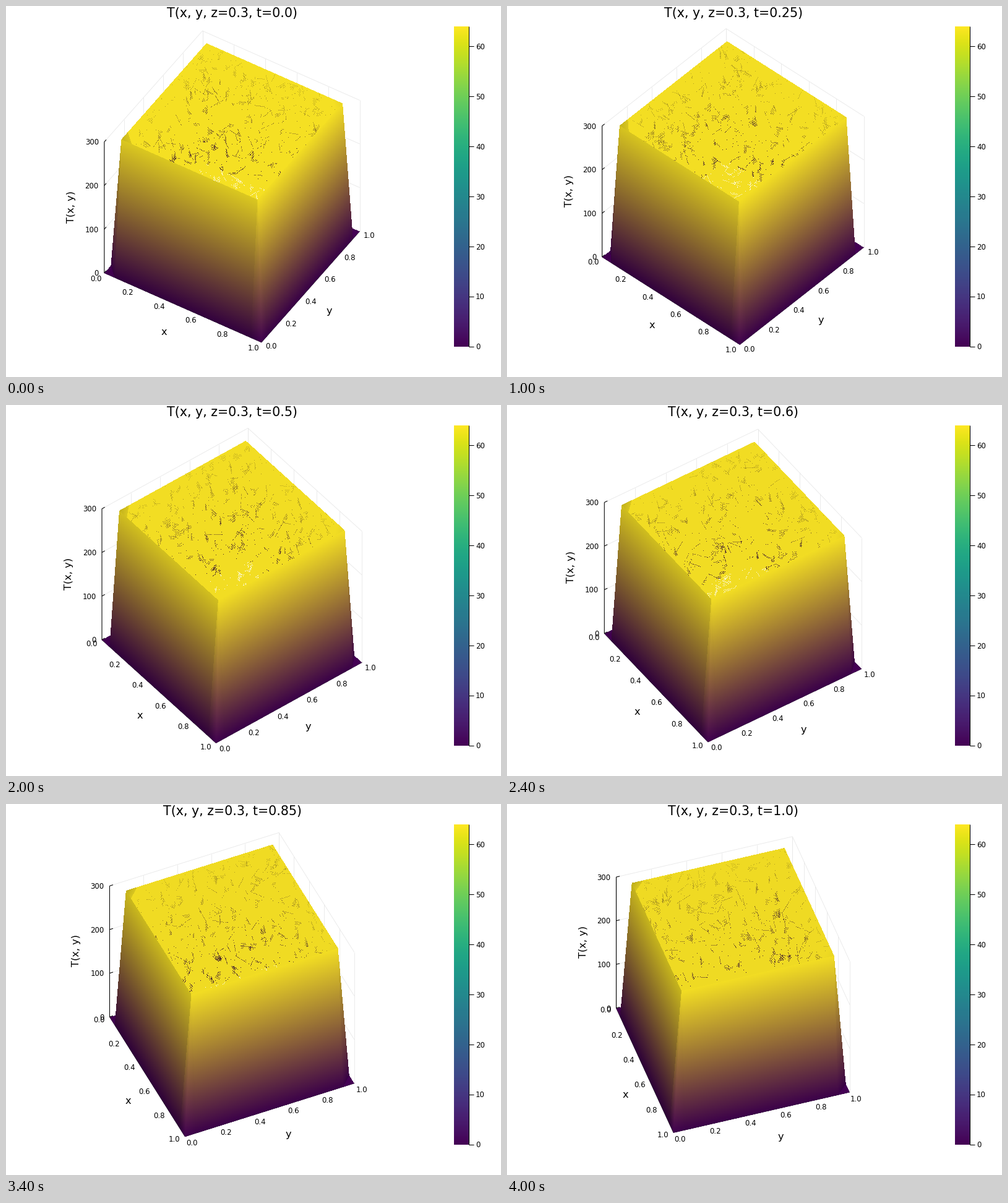
Animation, 800 px wide and 600 px high, one loop 4.2 s. Source, as a matplotlib script:

```python
import numpy as np
import matplotlib.pyplot as plt
from matplotlib.animation import FuncAnimation
from matplotlib.collections import LineCollection

WIDTH, HEIGHT, DPI = 800, 600, 100
FRAMES, INTERVAL = 21, 200
SIDE = 299.5                       # edge of the unit box in pixels
CENTRE = np.array([365.2, 292.0])
TILT = np.sqrt(0.5)                # sine and cosine of the 45 degree elevation
H = 1 / 15                         # grid spacing of the surface
K = 1 - H
LOW, HIGH = np.array([68, 1, 84]), np.array([253, 231, 37])
TICK, GUIDE, TITLE = 8.5, 11.7, 14.9

plt.rcParams["font.family"] = "DejaVu Sans"
fig = plt.figure(figsize=(WIDTH / DPI, HEIGHT / DPI), dpi=DPI, facecolor="white")
bar_ax = fig.add_axes([0, 0, 1, 1])
ax = fig.add_axes([0, 0, 1, 1])


def reset(axes):
    axes.clear()
    axes.set(xlim=(0, WIDTH), ylim=(HEIGHT, 0))
    axes.axis("off")


def show(axes, image, extent, **kw):
    axes.imshow(image, extent=extent, aspect="auto", interpolation="nearest", **kw)
    axes.set(xlim=(0, WIDTH), ylim=(HEIGHT, 0))


def line(axes, *points, zorder=1.5):
    axes.plot(*np.array(points).T, color="black", lw=.75, zorder=zorder,
              solid_capstyle="butt")


def label(axes, x, y, text, size=TICK, ha="center", **kw):
    axes.text(x, y, text, size=size, ha=ha, va="baseline", zorder=4, **kw)


class Camera:
    def __init__(self, degrees):
        angle = np.radians(degrees)
        self.cos, self.sin = np.cos(angle), np.sin(angle)
        self.x = SIDE * np.array([self.cos, self.sin * TILT])
        self.y = SIDE * np.array([self.sin, -self.cos * TILT])
        self.z = SIDE * np.array([0, -TILT])

    def __call__(self, x, y, z=0):
        return CENTRE + (x - .5) * self.x + (y - .5) * self.y + (z - .5) * self.z


def triangle(image, cam, corners, holes=None):
    """Fill a triangle, blending the corner colours; corners are (x, y, z, shade)."""
    a, b, c = (cam(*p[:3]) for p in corners)
    colors = np.array([(LOW + (HIGH - LOW) * p[2]) * p[3] for p in corners])
    x0, y0 = np.floor(np.min([a, b, c], axis=0)).astype(int)
    x1, y1 = np.ceil(np.max([a, b, c], axis=0)).astype(int) + 1
    gx, gy = np.meshgrid(np.arange(x0, x1) + .5, np.arange(y0, y1))
    (ux, uy), (vx, vy) = b - a, c - a
    area = ux * vy - uy * vx
    if abs(area) < 1e-6:
        return
    wb = ((gx - a[0]) * vy - (gy - a[1]) * vx) / area
    wc = (ux * (gy - a[1]) - uy * (gx - a[0])) / area
    weights = np.stack([1 - wb - wc, wb, wc], axis=-1)
    inside = weights.min(axis=-1) >= -1e-9
    if holes is not None:
        inside &= ~holes[y0:y1, x0:x1]
    patch = image[y0:y1, x0:x1]
    patch[inside, :3] = np.clip(weights[inside] @ colors, 0, 255)
    patch[inside, 3] = 255


def quad(image, cam, a, b, c, d, holes=None):
    triangle(image, cam, (a, b, c), holes)
    triangle(image, cam, (a, c, d), holes)


def pinholes(i, cam):
    """Ragged dotted strokes where the flat top lets the inside show through."""
    rng = np.random.default_rng(100 + i)
    mask = np.zeros((HEIGHT, WIDTH), bool)

    def punch(points):
        px, py = np.round(points).astype(int).T
        mask[py, px] = True

    for _ in range(165):
        start = cam(*rng.uniform(H, K, 2), 1)
        heading = rng.choice([0.1, 0.5, 1.1, 1.3, 2.1, 2.6]) + rng.normal(0, .15)
        step = 1.9 * np.array([np.cos(heading), np.sin(heading)])
        rows = rng.choice([1, 1, 2, 3, 5, 7])
        length = rng.integers(4, 16 if rows == 1 else 9)
        for row in range(rows):
            n = np.arange(max(length - row, 2))
            n = n[rng.random(n.size) < .75]
            punch(start + n[:, None] * step + [row % 2, 2 * row])
    punch([cam(u, v, 1) for u, v in rng.uniform(H, K, (200, 2))])
    return mask


def surface(i, cam):
    image = np.zeros((HEIGHT, WIDTH, 4), np.uint8)
    holes = pinholes(i, cam)
    top = .97 - .0012 * i
    left_top, left_low = .74 + .15 * cam.cos, .62 + .14 * cam.cos
    right_top, right_low = .96, .78 + .1 * cam.sin
    edge = .72 + .07 * cam.cos

    # inner side of the back walls
    quad(image, cam, (0, H, 0, .6), (0, K, 0, .6), (H, K, 1, .78), (H, H, 1, .78))
    quad(image, cam, (H, 1, 0, .6), (K, 1, 0, .6), (K, K, 1, .78), (H, K, 1, .78))
    for foot in ((0, K, 0, .6), (H, 1, 0, .6)):
        triangle(image, cam, ((0, 1, 0, .6), foot, (H, K, 1, .78)))

    # flat corners on the floor
    triangle(image, cam, ((0, 0, 0, .95), (0, H, 0, .95), (H, 0, 0, .95)))
    triangle(image, cam, ((1, 1, 0, 1), (1, K, 0, 1), (K, 1, 0, 1)))

    # top with its two softened corners
    quad(image, cam, (H, H, 1, top), (K, H, 1, top), (K, K, 1, top), (H, K, 1, top),
         holes)
    triangle(image, cam, ((H, H, 1, edge), (2 * H, H, 1, .86), (H, 2 * H, 1, .86)))
    triangle(image, cam, ((K, K, 1, .92), (K - H, K, 1, top), (K, K - H, 1, top)))

    # front walls and bevelled corners
    triangle(image, cam, ((0, H, 0, edge), (H, 0, 0, left_low), (H, H, 1, edge)))
    triangle(image, cam, ((K, 1, 0, .8), (1, K, 0, right_low), (K, K, 1, .92)))
    quad(image, cam, (H, 0, 0, left_low), (K, 0, 0, left_low),
         (K, H, 1, left_top), (H, H, 1, left_top))
    quad(image, cam, (1, H, 0, right_low), (1, K, 0, right_low),
         (K, K, 1, right_top), (K, H, 1, right_top))
    triangle(image, cam, ((1, 0, 0, .95), (K, 0, 0, left_low), (K, H, 1, .92)))
    triangle(image, cam, ((1, 0, 0, .95), (1, H, 0, right_low), (K, H, 1, .95)))
    return image


def draw_grid(cam):
    lines = []
    for s in np.linspace(0, 1, 6):
        lines += [[cam(0, s, 0), cam(0, s, 1)], [cam(s, 1, 0), cam(s, 1, 1)]]
    for z in np.linspace(0, 1, 4):
        lines.append([cam(0, 0, z), cam(0, 1, z), cam(1, 1, z)])
    ax.add_collection(LineCollection(lines, colors="0.91", linewidths=.6, zorder=1))


def draw_axes(cam):
    line(ax, cam(0, 0, 1), cam(0, 0), cam(1, 0), cam(1, 1))
    for s in np.linspace(0, 1, 6):
        px, py = cam(s, -.05)
        label(ax, px - 2 - 3.6 * cam.cos, py + 4.3, f"{s:.1f}")
        px, py = cam(1.05, s)
        label(ax, px + 6 * cam.sin, py + 4.8, f"{s:.1f}")
    for z in range(0, 301, 100):
        px, py = cam(0, 0, z / 300)
        line(ax, (px, py), cam(0, .02, z / 300))
        label(ax, px - 9, py + 4.6, str(z), ha="right")
    px, py = cam(.5, 0)
    label(ax, px - 31, py + 44, "x", GUIDE)
    px, py = cam(1, .5)
    label(ax, px + 30.5, py + 44, "y", GUIDE)
    px, py = cam(0, 0, .5)
    label(ax, px - 49, py - 1, "T(x, y)", GUIDE, rotation=90, rotation_mode="anchor")


def draw_colorbar():
    reset(bar_ax)
    left, right, top, bottom = 724, 748, 33, 551
    ramp = np.linspace(1, 0, 256)[:, None]
    show(bar_ax, ramp, (left, right, bottom, top), cmap="viridis")
    line(bar_ax, (right, top), (right, bottom))
    for value in range(0, 61, 10):
        y = bottom - value * (bottom - top) / 64
        line(bar_ax, (right, y), (right + 8, y))
        label(bar_ax, 759, y + 4.4, str(value), ha="left")


def update(i):
    reset(ax)
    cam = Camera(32 + 2 * i)
    draw_grid(cam)
    show(ax, surface(i, cam), (0, WIDTH, HEIGHT, 0), zorder=2)
    draw_axes(cam)
    label(ax, 366, 18.5, f"T(x, y, z=0.3, t={round(.05 * i, 2)})", TITLE)
    return []


draw_colorbar()
animation = FuncAnimation(fig, update, frames=FRAMES, interval=INTERVAL,
                          init_func=lambda: update(0), repeat=True, repeat_delay=0)
plt.show()
```
